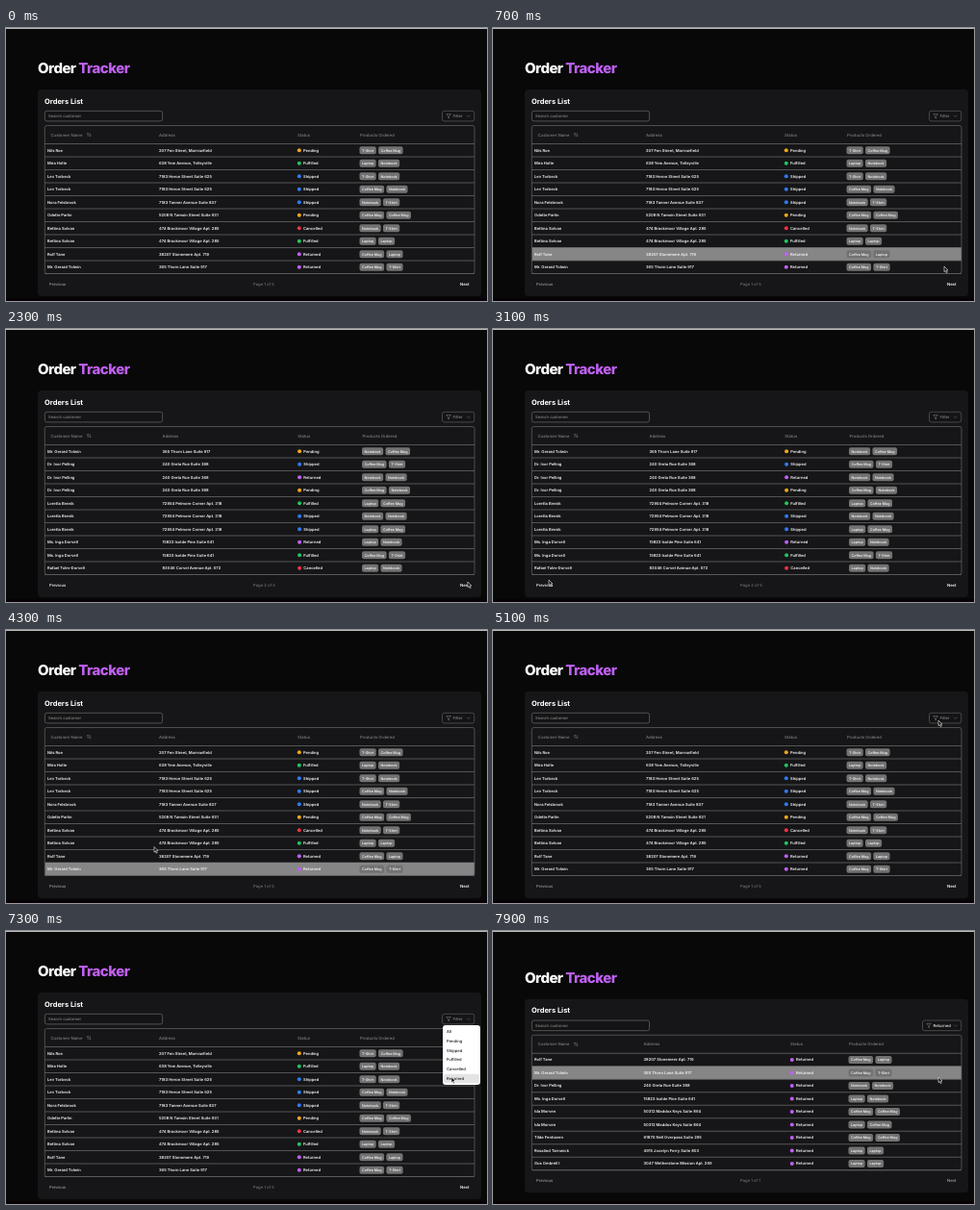
Animation of 500x284 px, one loop 8 s. Source, as an HTML page with a canvas:

```html
<!DOCTYPE html>
<html lang="en">
<head>
<meta charset="utf-8">
<title>Order Tracker</title>
<style>
  html, body { margin: 0; width: 100%; height: 100%; overflow: hidden; background: #080808; }
  canvas { display: block; width: 500px; height: 284px; }
</style>
</head>
<body>
<canvas id="stage"></canvas>
<script>
const W = 500, H = 284, LOOP = 8000, STEP = 200;
const ROW = 13.5, PURPLE = '#c060f5';
const canvas = document.getElementById('stage');
const ctx = canvas.getContext('2d');
const scale = window.devicePixelRatio || 1;
canvas.width = W * scale;
canvas.height = H * scale;

const people = {
  nils: ['Nils Roe', '207 Fen Street, Marrowfield'],
  mira: ['Mira Holte', '638 Yew Avenue, Tolleyville'],
  lev: ['Lev Torbeck', '7183 Heron Street Suite 625'],
  nora: ['Nora Felsbrook', '7183 Tanner Avenue Suite 837'],
  odette: ['Odette Parlin', '5208 N Tamsin Street Suite 931'],
  bettina: ['Bettina Solvan', '474 Brackmoor Village Apt. 285'],
  rolf: ['Rolf Tane', '38207 Stonemere Apt. 719'],
  gerard: ['Mr. Gerard Tolwin', '365 Thorn Lane Suite 917'],
  ivor: ['Dr. Ivor Pelling', '240 Greta Rue Suite 368'],
  loretta: ['Loretta Brenik', '72954 Pelmore Corner Apt. 318'],
  inga: ['Ms. Inga Dorvell', '15823 Isolde Pine Suite 641'],
  rafael: ['Rafael Tolm-Dorvell', '83046 Corvel Avenue Apt. 572'],
  ida: ['Ida Morven', '50312 Maddox Keys Suite 864'],
  tilda: ['Tilda Fenhaven', '61870 Nell Overpass Suite 295'],
  rosalind: ['Rosalind Tarnwick', '4915 Jocelyn Ferry Suite 803'],
  gus: ['Gus Ombrell I', '3047 Wetherstone Mission Apt. 269']
};
const statuses = {
  P: ['Pending', '#f0a818'],
  S: ['Shipped', '#2f7bf5'],
  F: ['Fulfilled', '#22c55e'],
  C: ['Cancelled', '#ef3340'],
  R: ['Returned', PURPLE]
};
const products = { T: 'T-Shirt', C: 'Coffee Mug', L: 'Laptop', N: 'Notebook' };
const menuItems = ['All', 'Pending', 'Shipped', 'Fulfilled', 'Cancelled', 'Returned'];

// Each order: customer, status, products
const orders = list => list.split(', ').map(item => item.split(' '));
const pageOne = {
  rows: orders('nils P TC, mira F LN, lev S TN, lev S CN, nora S NT, odette P CC, ' +
    'bettina C NT, bettina F LL, rolf R CL, gerard R CT'),
  address: 159, status: 303, items: 367.5,
  filter: 'Filter', filterX: 453.5, pager: 'Page 1 of 5', prev: '#9a9a9a', next: '#fff'
};
const pageTwo = {
  rows: orders('gerard P NC, ivor S CT, ivor R NN, ivor P CN, loretta F LC, loretta S NN, ' +
    'loretta S LC, inga R LN, inga F CT, rafael C LN'),
  address: 162.5, status: 303.3, items: 370,
  filter: 'Filter', filterX: 453.5, pager: 'Page 2 of 5', prev: '#fff', next: '#fff'
};
const returned = {
  rows: orders('rolf R CL, gerard R CT, ivor R NN, inga R LN, ida R CC, ida R LC, ' +
    'tilda R CC, rosalind R LL, gus R LL'),
  address: 156.5, status: 309, items: 369.5,
  filter: 'Returned', filterX: 446.5, pager: 'Page 1 of 1', prev: '#9a9a9a', next: '#9a9a9a'
};

// Cursor path: time, x, y
const path = [
  [500, 462, 222], [700, 469, 248], [900, 479, 263], [2500, 480, 263],
  [2900, 90, 263], [3100, 58, 261], [4100, 58, 261], [4500, 250, 190],
  [4900, 463, 94], [5900, 463, 94], [7100, 463, 152]
];

function cursorAt(t) {
  if (t < path[0][0]) return null;
  const i = path.findIndex(p => p[0] > t);
  if (i < 0) return path[path.length - 1].slice(1);
  const [t0, x0, y0] = path[i - 1], [t1, x1, y1] = path[i];
  const k = (t - t0) / (t1 - t0);
  return [x0 + (x1 - x0) * k, y0 + (y1 - y0) * k];
}

function text(str, x, y, size, color, weight = 500, spacing = 0) {
  ctx.font = `${weight} ${size}px Inter, Roboto, sans-serif`;
  ctx.letterSpacing = spacing + 'px';
  ctx.fillStyle = color;
  // Centre the capitals on y
  ctx.fillText(str, x, y + size * 0.365);
  return ctx.measureText(str).width;
}

function box(x, y, w, h, r, fill, stroke) {
  ctx.beginPath();
  ctx.roundRect(x, y, w, h, r);
  if (fill) { ctx.fillStyle = fill; ctx.fill(); }
  if (stroke) { ctx.strokeStyle = stroke; ctx.lineWidth = 0.8; ctx.stroke(); }
}

function line(points, color, width = 0.6) {
  ctx.beginPath();
  points.forEach(([x, y]) => ctx.lineTo(x, y));
  ctx.strokeStyle = color;
  ctx.lineWidth = width;
  ctx.stroke();
}

function title(y) {
  const w = text('Order ', 33, y, 15, '#fff', 800, -0.55);
  text('Tracker', 33 + w, y, 15, PURPLE, 800, -0.55);
}

function spinner(t) {
  const a = (t - 1700) / 1000 * Math.PI * 2;
  ctx.beginPath();
  ctx.arc(263.5, 171.5, 4.3, a, a + Math.PI * 1.5);
  ctx.strokeStyle = '#707070';
  ctx.lineWidth = 1.5;
  ctx.stroke();
}

function filterButton(page) {
  const x = page.filterX, color = page === returned ? '#f0f0f0' : '#858585';
  box(x, 86.3, 486.7 - x, 10.6, 2, '#141416', '#555');
  const f = x + 4.3;
  line([[f, 89.5], [f + 4.6, 89.5], [f + 2.8, 91.8], [f + 2.8, 94],
    [f + 1.8, 93.4], [f + 1.8, 91.8], [f, 89.5]], '#858585', 0.5);
  text(page.filter, x + 11, 91.6, 4.2, color);
  line([[479, 90.8], [480.7, 92.5], [482.4, 90.8]], '#777', 0.5);
}

function sortIcon(x, y) {
  line([[x - 2, y - 0.6], [x - 0.9, y - 1.8], [x + 0.2, y - 0.6]], '#858585', 0.5);
  line([[x - 0.9, y - 1.8], [x - 0.9, y + 1.8]], '#858585', 0.5);
  line([[x + 0.2, y + 0.6], [x + 1.3, y + 1.8], [x + 2.4, y + 0.6]], '#858585', 0.5);
  line([[x + 1.3, y - 1.8], [x + 1.3, y + 1.8]], '#858585', 0.5);
}

function orderRow(page, [who, status, items], top, hovered) {
  const y = top + ROW / 2, [name, address] = people[who], [label, color] = statuses[status];
  if (hovered) {
    ctx.fillStyle = '#868686';
    ctx.fillRect(40.5, top, 446.5, ROW);
  }
  text(name, 43, y, 4.08, '#f4f4f4', 600);
  text(address, page.address, y, 4.08, '#f4f4f4', 600);
  ctx.beginPath();
  ctx.arc(page.status + 1.8, y, 2, 0, Math.PI * 2);
  ctx.fillStyle = color;
  ctx.fill();
  text(label, page.status + 6, y, 4.08, '#f4f4f4', 600);
  let x = page.items;
  for (const key of items) {
    ctx.font = '600 3.65px Inter, Roboto, sans-serif';
    ctx.letterSpacing = '0px';
    const w = ctx.measureText(products[key]).width + 5;
    box(x, y - 4, w, 8, 2, '#727272');
    text(products[key], x + 2.5, y, 3.65, '#f0f0f0', 600);
    x += w + 2.3;
  }
  line([[40, top + ROW], [487, top + ROW]], '#666', 0.8);
}

function tracker(page, pointer) {
  const count = page.rows.length, shift = (10 - count) * ROW / 2;
  const bottom = 120.5 + count * ROW;
  title(41.5 + shift);
  ctx.save();
  ctx.translate(0, shift);
  box(33, 64, 461, bottom + 23.5 - 64, 4, '#161618');
  text('Orders List', 40, 76, 7.5, '#fff', 700);
  box(40.4, 86.3, 122.2, 10.6, 2, '#141416', '#606060');
  text('Search customer', 44, 91.6, 4.2, '#858585');
  filterButton(page);

  text('Customer Name', 46.5, 111, 4.25, '#808080');
  sortIcon(86, 111);
  text('Address', page.address, 111, 4.25, '#808080');
  text('Status', page.status, 111, 4.25, '#808080');
  text('Products Ordered', page.items + 0.5, 111, 4.25, '#808080');
  line([[40, 120.5], [487, 120.5]], '#666', 0.8);
  const inside = pointer && pointer[0] > 40 && pointer[0] < 487;
  const over = inside ? Math.floor((pointer[1] - shift - 120.5) / ROW) : -1;
  page.rows.forEach((row, i) => orderRow(page, row, 120.5 + i * ROW, i === over));
  box(40.3, 101.5, 446.7, bottom - 101.5, 2, null, '#5c5c5c');

  text('Previous', 45, bottom + 11, 4.2, page.prev);
  text(page.pager, 257, bottom + 11, 4.2, '#707070');
  text('Next', 472, bottom + 11, 4.2, page.next, 600);
  ctx.restore();
}

function menu(pointer) {
  box(454, 98, 39, 62, 3, '#fff');
  menuItems.forEach((item, i) => {
    const y = 104.5 + i * 9.8;
    if (Math.abs(pointer[1] - y) < 4.9) box(455.5, y - 4.7, 36, 9.4, 1.5, '#e4e4e4');
    text(item, 458, y, 4.15, '#1a1a1a');
  });
}

function arrow([x, y]) {
  ctx.beginPath();
  [[0, 0], [0, 5.6], [1.3, 4.5], [2.3, 6.7], [3.3, 6.2], [2.3, 4.1], [4, 4]]
    .forEach(([dx, dy]) => ctx.lineTo(x + dx, y + dy));
  ctx.closePath();
  ctx.fillStyle = '#111';
  ctx.fill();
  ctx.strokeStyle = '#eee';
  ctx.lineWidth = 0.6;
  ctx.stroke();
}

function draw(t) {
  ctx.setTransform(scale, 0, 0, scale, 0, 0);
  ctx.textRendering = 'geometricPrecision';
  ctx.fillStyle = '#080808';
  ctx.fillRect(0, 0, W, H);

  const pointer = cursorAt(t);
  const loading = (t >= 1500 && t < 2300) || (t >= 7700 && t < 7900);
  const menuOpen = t >= 5500 && t < 7700;
  if (loading) {
    title(137.5);
    spinner(t);
  } else {
    const page = t >= 7900 ? returned : t >= 2300 && t < 3900 ? pageTwo : pageOne;
    // Row highlight trails the pointer slightly
    tracker(page, menuOpen ? null : cursorAt(t - 100));
    if (menuOpen) menu(pointer);
  }
  ctx.fillStyle = '#b8b8b8';
  ctx.fillRect(0, 0, W, 1);
  ctx.fillStyle = '#080006';
  ctx.fillRect(0, 281, W, 3);
  if (pointer) arrow(pointer);
}

function tick(now) {
  const t = now % LOOP;
  // The picture advances in steps, offset by half a step
  draw(Math.max(0, Math.floor((t + STEP / 2) / STEP) * STEP - STEP / 2));
  requestAnimationFrame(tick);
}
requestAnimationFrame(tick);
</script>
</body>
</html>
```
